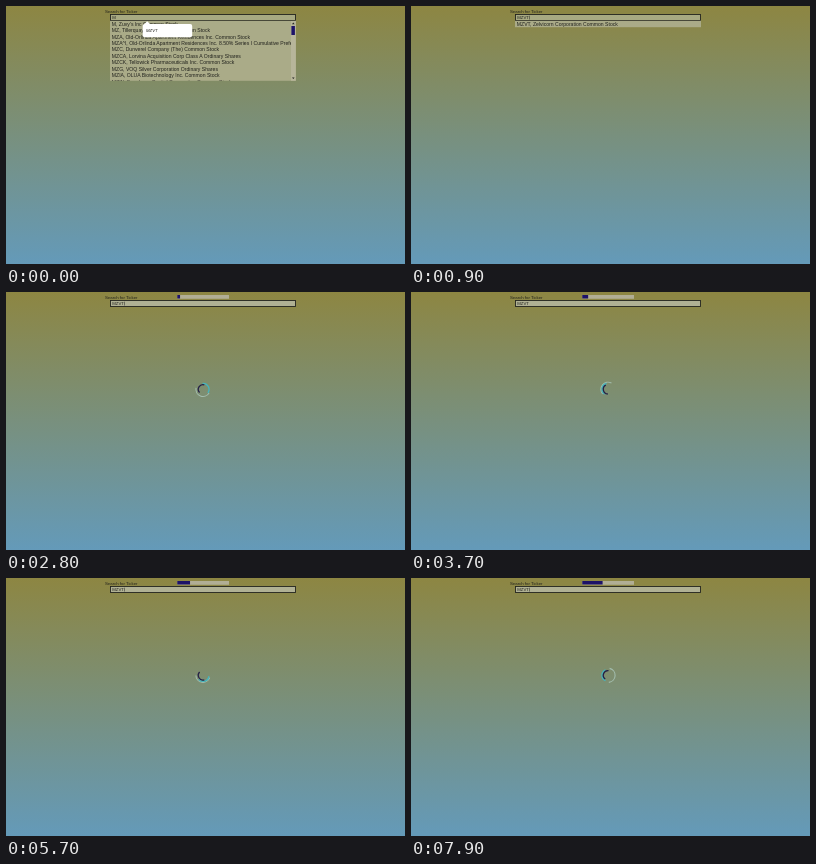
Write an HTML page that moves like this. It is 399x258 px and loops after 8000 ms.

```html
<!DOCTYPE html>
<html lang="en">
<head>
<meta charset="utf-8">
<title>Ticker search</title>
<style>
  html, body { margin: 0; width: 100%; height: 100%; overflow: hidden; }
  body { background: linear-gradient(#8d8642, #649ab9); }
  svg { display: block; }
  text { font-family: "Liberation Sans", Arial, sans-serif; fill: #20211c; }
  .small { font-size: 4.3px; }
  .row { font-size: 5.1px; }
  .panel { fill: #aaab88; }
  .ring { fill: none; stroke-linecap: butt; }
</style>
</head>
<body>
<svg width="399" height="258" viewBox="0 0 399 258">
  <text class="small" x="99" y="7.4">Search for Ticker</text>
  <g id="progress">
    <rect x="171.3" y="3" width="51.7" height="3.8" fill="#b1ae95"/>
    <rect id="bar" x="171.3" y="3" height="3.5" fill="#1d1268"/>
  </g>
  <rect id="field" x="104.5" y="8.5" width="185" height="6" stroke="#24251f" stroke-width=".9"/>
  <text id="query" class="small" x="106.2" y="13.1"></text>
  <rect id="caret" y="9.7" width=".5" height="3.8" fill="#222"/>

  <g id="matches">
    <rect class="panel" x="104" y="14.8" width="186" height="60"/>
    <svg id="rows" x="104" y="14.8" width="181" height="60"></svg>
    <rect x="285" y="15" width="4.7" height="59.8" fill="#b7b59a"/>
    <path d="M286 18.2l1.3-1.6 1.3 1.6zM286 71.4l1.3 1.6 1.3-1.6z" fill="#222"/>
    <rect x="285.4" y="20" width="3.5" height="9" fill="#1d1268"/>
  </g>
  <g id="match">
    <rect class="panel" x="104" y="14.8" width="186" height="6.4"/>
    <text class="row" x="105.8" y="19.6">MZVT, Zelvicorn Corporation Common Stock</text>
  </g>
  <g id="hint">
    <path d="M138 18.5l3.2-3.2 3.2 3.2z" fill="#fff"/>
    <rect x="136.7" y="18" width="49.5" height="13.2" rx="2" fill="#fff"/>
    <text class="small" x="140" y="26.2" font-style="italic">MZVT</text>
  </g>

  <g id="spinner" transform="translate(197 97.3)">
    <path class="ring" stroke="#a3bdae" stroke-width="1.1"/>
    <path class="ring" stroke="#45b5bd" stroke-width="1.3"/>
    <path class="ring" stroke="#252047" stroke-width="1.3"/>
  </g>
</svg>
<script>
const LOOP = 8000, CHOSEN = 400, SEARCH = 1300;
const $ = id => document.getElementById(id);
const show = (id, on) => $(id).style.display = on ? '' : 'none';

[
  "M, Zuvy's Inc Common Stock",
  'MZ, Tillerquay Incorporated Common Stock',
  'MZA, Old-Orlinda Apartment Residences Inc. Common Stock',
  'MZA^I, Old-Orlinda Apartment Residences Inc. 8.50% Series I Cumulative Preferred',
  'MZC, Dunverel Company (The) Common Stock',
  'MZCA, Lorvina Acquisition Corp Class A Ordinary Shares',
  'MZCK, Tellowick Pharmaceuticals Inc. Common Stock',
  'MZG, VOQ Silver Corporation Ordinary Shares',
  'MZIA, OLUA Biotechnology Inc. Common Stock',
  'MZIN, Fern Lane Capital Corporation Common Stock'
].forEach((label, i) => {
  const row = document.createElementNS('http://www.w3.org/2000/svg', 'text');
  row.setAttribute('class', 'row');
  row.setAttribute('x', 1.8);
  row.setAttribute('y', 4.9 + i * 6.45);
  row.textContent = label;
  $('rows').append(row);
});

// Arc of the given span, centred on the top of the ring.
const arc = (r, span) => {
  const a = span * Math.PI / 360, x = r * Math.sin(a), y = -r * Math.cos(a);
  return `M${-x} ${y}A${r} ${r} 0 0 1 ${x} ${y}`;
};
const rings = [...document.querySelectorAll('.ring')];
[[7.1, 160], [6, 130], [4.7, 150]].forEach(([r, span], i) =>
  rings[i].setAttribute('d', arc(r, span)));

// The middle ring turns unevenly: [time, angle].
const turns = [[0, -263], [2000, 225], [3700, 640], [5000, 990], [6500, 1530], [8000, 1723]];
function middleAngle(t) {
  const i = turns.findIndex(([time]) => time > t);
  const [t0, a0] = turns[i - 1], [t1, a1] = turns[i];
  return a0 + (a1 - a0) * (t - t0) / (t1 - t0);
}

function draw(now) {
  const t = now % LOOP, chosen = t >= CHOSEN, searching = t >= SEARCH;
  show('matches', !chosen);
  show('hint', !chosen);
  show('match', chosen && !searching);
  show('progress', searching);
  show('spinner', searching);
  $('query').textContent = chosen ? 'MZVT' : 'M';
  $('field').setAttribute('fill', searching ? '#b0b194' : '#a7a982');
  $('caret').setAttribute('x', chosen ? 118.2 : 110);
  show('caret', (t + 800) % 1200 < 600);
  $('bar').setAttribute('width', Math.max(0, t - 2000) * 0.00344);
  const s = (t - 2000) / 1000;
  [105 + 120 * s, middleAngle(t), 20 + 351 * s].forEach((angle, i) =>
    rings[i].setAttribute('transform', `rotate(${angle})`));
}

const start = performance.now();
function tick() {
  draw(performance.now() - start);
  requestAnimationFrame(tick);
}
tick();
</script>
</body>
</html>
```
